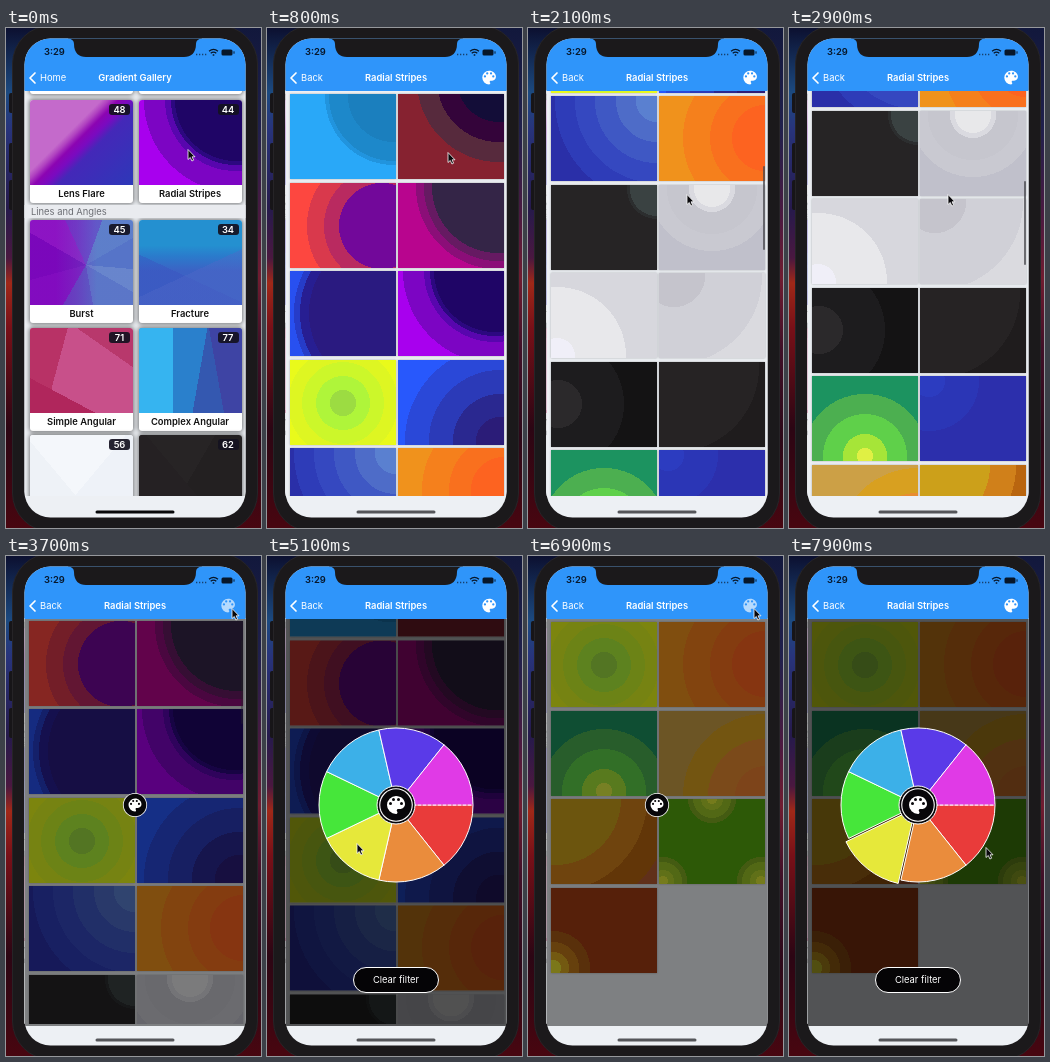
An HTML page for the animation above (8000 ms loop, 255 px wide and 500 px high).

```html
<!DOCTYPE html>
<html lang="en">
<head>
<meta charset="utf-8">
<title>Gradient gallery</title>
<style>
html, body { margin: 0; width: 100%; height: 100%; overflow: hidden; }
body { position: relative; font: 9.4px Inter, "Liberation Sans", sans-serif;
  background: linear-gradient(#0c1030, #1c4a80 13%, #28347c 20%, #261a4c 36%, #4a1840 46%, #a02818 51%, #781018 60%, #2c0614 80%, #480610) 0 0 / 50% 100% no-repeat,
    linear-gradient(#12183c, #20204c 20%, #4c1a40 38%, #701c30 50%, #401028 64%, #2c0818 82%, #480610); }
div, svg, span { position: absolute; box-sizing: border-box; }
svg { overflow: visible; }
.key { left: 3px; width: 5px; background: #171518; border-radius: 2px; }
#body { left: 6px; top: -3px; width: 246px; height: 507px; border-radius: 39px; background: #1b191b; border: 1px solid #262427; }
#screen { left: 0; top: 0; width: 255px; height: 500px; background: #edf0f4; clip-path: inset(10.5px 15.5px 10.5px 18.5px round 26px); }
#view { left: 18px; top: 62px; width: 222px; height: 406px; overflow: hidden; }
.page { left: 0; top: 0; width: 222px; height: 406px; background: #edf0f4; }
#detail { overflow: hidden; }
.list { left: 0; top: 0; }
.cell { width: 106px; height: 85px; box-shadow: 0 0 2px rgba(0,0,0,.3); }
.card { width: 103px; height: 103px; border-radius: 3px; overflow: hidden; background: #fff; box-shadow: 0 0 4px 1px rgba(0,0,0,.5); }
.card div { left: 0; top: 0; width: 103px; height: 85px; }
.card b { position: absolute; left: 0; top: 85px; width: 100%; line-height: 18px; text-align: center; font-weight: 600; color: #111; }
.card span { right: 3px; top: 4px; width: 21px; line-height: 11px; text-align: center; border-radius: 3px; background: rgba(20,18,32,.92); color: #fff; font-weight: 600; }
#bar { left: 217px; width: 2px; border-radius: 1px; background: rgba(70,70,75,.75); }
#nav { left: 18px; top: 10px; width: 222px; height: 52.5px; background: #2f95fa; }
.label { color: #fff; line-height: 14px; top: 43px; white-space: nowrap; }
.title { left: 29px; width: 200px; text-align: center; font-weight: 600; }
#clear { left: 86px; top: 411px; width: 86px; height: 26px; border: 1.5px solid #fff; border-radius: 13px; background: #050406; color: #fff; text-align: center; line-height: 23px; }
#shade { left: 18px; top: 62.5px; width: 222px; height: 407.5px; background: #000; }
</style>
</head>
<body>
<div class="key" style="top:65px;height:20px"></div>
<div class="key" style="top:115px;height:30px"></div>
<div class="key" style="top:152px;height:30px"></div>
<div id="body"></div>
<div id="screen">
  <div id="view">
    <div id="gallery" class="page"></div>
    <div id="detail" class="page">
      <div id="all" class="list"></div>
      <div id="some" class="list"></div>
      <div id="bar"></div>
    </div>
  </div>
  <div id="nav"></div>
  <span class="label" style="left:38px;top:17px;color:#07172a;font-weight:600">3:29</span>
  <span class="label" id="home" style="left:34px">Home</span>
  <span class="label" id="back" style="left:34px">Back</span>
  <span class="label title" id="title1">Gradient Gallery</span>
  <span class="label title" id="title2">Radial Stripes</span>
  <div id="shade"></div>
  <svg width="255" height="500">
    <defs>
      <path id="palette" d="M12 3a9 9 0 0 0 0 18c.83 0 1.5-.67 1.5-1.5 0-.39-.15-.74-.39-1.01-.23-.26-.38-.61-.38-.99 0-.83.67-1.5 1.5-1.5H16c2.76 0 5-2.24 5-5 0-4.42-4.03-8-9-8zM6.5 12a1.5 1.5 0 1 1 0-3 1.5 1.5 0 0 1 0 3zm3-4a1.5 1.5 0 1 1 0-3 1.5 1.5 0 0 1 0 3zm5 0a1.5 1.5 0 1 1 0-3 1.5 1.5 0 0 1 0 3zm3 4a1.5 1.5 0 1 1 0-3 1.5 1.5 0 0 1 0 3z" fill-rule="evenodd"/>
    </defs>
    <path d="M62 9H196V10.500Q190 11 190 16C190 25 185 29 178 29H80C73 29 68 25 68 16Q68 11 62 10.500Z" fill="#1b191b"/>
    <path d="M29 45l-5 5 5 5" fill="none" stroke="#fff" stroke-width="1.700" stroke-linecap="round" stroke-linejoin="round"/>
    <path d="M190 26.500h11" stroke="#17406e" stroke-width="1.300" stroke-dasharray="1.300 1.700"/>
    <g fill="none" stroke="#07172a" stroke-width="1.300">
      <path d="M203 23.200q4.500-3.600 9 0M204.700 25.200q2.800-2.200 5.600 0"/>
      <path d="M206.700 27h1.600"/>
    </g>
    <rect x="215.500" y="21.500" width="11" height="6" rx="1.500" fill="#07172a"/>
    <path d="M228 23.300v2.400" stroke="#07172a"/>
    <use id="tool" href="#palette" fill="#fff" transform="translate(213 40.500) scale(.76)"/>
    <g id="wheel"></g>
    <g id="hub">
      <circle r="16.800" fill="#fff"/><circle r="15.700" fill="#08070a"/>
      <use href="#palette" fill="#fff" transform="translate(-12 -12)"/>
    </g>
    <path id="grip" d="M91 484H167" stroke="#222224" stroke-width="3" stroke-linecap="round"/>
  </svg>
  <div id="clear">Clear filter</div>
</div>
<svg width="255" height="500">
  <path id="cursor" d="M0 .5V10.500L2.300 8.500 3.900 12 5.600 11.200 4.100 7.800H7Z" fill="#08070a" stroke="#fff" stroke-width=".8"/>
</svg>
<script>
const $ = id => document.getElementById(id);

// Hard-edged rings: centre, then "colour radius" pairs from the middle outwards, last colour fills.
const rings = (x, y, spec) => {
  const parts = spec.split(' ');
  let from = 0;
  const stops = [];
  for (let i = 0; i < parts.length; i += 2) {
    const to = parts[i + 1] || 300;
    stops.push(`${parts[i]} ${from}px ${to}px`);
    from = to;
  }
  return `radial-gradient(circle at ${x}px ${y}px, ${stops.join()})`;
};
const violet = rings(97, 0, '#1f0566 61 #2c0880 65 #5806ae 71 #7c05c3 92 #a800ee');
const spot = (x, y) => rings(x, y, '#dce834 5 #b4d22e 11 #9bc428 19 #80ac22 24 transparent');
const cells = [
  rings(104, 2, '#1b7fbe 46 #1d88ca 65 #2194de 69 #29a8f8'),
  rings(101, -14, '#130d38 42 #34043a 62 #572a3d 82 #862230'),
  rings(92, 43, '#72089a 43 #b92a60 58 #d9394c 75 #fd4740'),
  rings(100, 4, '#342547 66 #661a62 74 #8b0e78 82 #b8058e'),
  rings(96, 42, '#2a1a80 77 #271e92 86 #263cc8 92 #2850f0'),
  violet,
  rings(53, 43, '#9cdc42 13 #aff53a 27 #ccf72a 41 #def622 55 #e9fa1b'),
  rings(102, 81, '#2b1c78 24 #2a2890 47 #2b3ab8 71 #2a48d8 95 #2858fc'),
  rings(106, 5, '#5a80d0 21 #4e6cc8 41 #3f58c4 62 #3548c0 82 #2e3cb8 102 #2a2fa8'),
  rings(106, 42, '#fd6320 33 #f9701e 55 #f5801c 82 #f0921c'),
  rings(106, 4, '#3a4242 27 #2c2e2f 30 #262425'),
  rings(53, 4, '#e8e8ea 18 #dadae0 23 #c6c6ce 45 #c9c9d1 62 #c0c0cb'),
  rings(6, 83, '#f0eff8 18 #e8e8eb 69 #d7d7dd'),
  rings(15, 3, '#c5c4cc 31 #d0d0d7 88 #dadadf'),
  rings(7, 42, '#2b292b 24 #1d1c1e 66 #141314'),
  rings(15, 5, '#262324 85 #1f1c1d'),
  rings(53, 80, '#e0f044 8 #a6e538 22 #5fd04a 42 #4caf50 62 #1c9360'),
  rings(9, 5, '#2c3cc0 16 #2b36b6 50 #2c2fac'),
  rings(106, 85, '#ec8030 30 #e88c30 57 #d8a020 82 #cca046'),
  rings(4, 0, '#cca01a 66 #d0801a 92 #b9650f 118 #b55a30'),
  `${spot(53, 0)}, ${spot(4, 82)}, ${spot(102, 82)}, #54a80e`,
  rings(20, 20, '#4a2ab0 30 #38209a 60 #2a1878'),
  rings(2, 80, '#e8e030 8 #d8a820 16 #c07818 26 #a85a14 37 #a23c12'),
  rings(50, 40, '#2c2a2d 30 #1d1b1e')
];
const fill = (list, items) => list.innerHTML = items.map((bg, i) =>
  `<div class="cell" style="left:${i % 2 ? 113 : 4.5}px;top:${4 + (i >> 1) * 88.5}px;background:${bg}"></div>`).join('');
fill($('all'), cells);
fill($('some'), [6, 9, 16, 18, 19, 20, 22].map(i => cells[i]));

const cards = [
  ['', '', '#ddd', -99],
  ['', '', '#ddd', -99],
  ['Lens Flare', 48, 'linear-gradient(135deg,#c46acb 38%,#b042c0 42%,#8c04b2 47%,#7a0ac0 53%,#4428b8 60%,#2d38b8)', 9.5],
  ['Radial Stripes', 44, violet, 9.5],
  ['Burst', 45, 'conic-gradient(from 20deg at 56px 45px,#6488cc88 40deg,#5674c888 0 75deg,#7894d088 0 100deg,#6078c888 0 150deg,#5a50c088 0 190deg,#8010c088 0 235deg,#7208b888 0 280deg,#9420c888 0 315deg,#6c40c888 0),linear-gradient(90deg,#8406be 25%,#7630c0 45%,#5674c8 65%)', 130],
  ['Fracture', 34, 'linear-gradient(155deg,transparent 58%,#5068c866 0),linear-gradient(-155deg,transparent 62%,#3a50c066 0),linear-gradient(#2490d0 30%,#2a7ccc 42%,#3c62c4 60%)', 130],
  ['Simple Angular', 71, 'linear-gradient(28deg,#b0265c 25%,transparent 0),linear-gradient(105deg,#b83266 30%,transparent 0),linear-gradient(35deg,#c8508a 75%,#b8386c 0)', 238],
  ['Complex Angular', 77, 'linear-gradient(90deg,#36b4f0 33%,transparent 0),linear-gradient(80deg,transparent 72%,#3e44a4 0),linear-gradient(100deg,#2a80cc 58%,#3458b0 0)', 238],
  ['', 56, 'linear-gradient(50deg,#eef2f7 38%,transparent 0),linear-gradient(130deg,#f4f7fb 55%,#eef2f8 0)', 345],
  ['', 62, 'linear-gradient(50deg,#252123 45%,transparent 0),linear-gradient(120deg,#272425 50%,#232021 0)', 345]
];
$('gallery').innerHTML = cards.map(([name, count, bg, top], i) =>
  `<div class="card" style="left:${i % 2 ? 114.5 : 6}px;top:${top}px"><div style="background:${bg}"></div><b>${name}</b><span>${count}</span></div>`).join('') +
  '<span style="left:0;top:115px;width:222px;padding-left:7px;line-height:13px;background:#e9ebef;color:#6c6e74">Lines and Angles</span>';

// Colour wheel, clockwise from the right
const hues = ['#e93b3a', '#ea8c3c', '#e6e83a', '#46e63a', '#3cb0e8', '#5a3ae8', '#e03ae6'];
const step = 2 * Math.PI / hues.length;
const rim = k => `${77 * Math.cos(k * step)} ${77 * Math.sin(k * step)}`;
$('wheel').innerHTML = hues.map((c, i) =>
  `<path d="M0 0L${rim(i)}A77 77 0 0 1 ${rim(i + 1)}Z" fill="${c}" stroke="#fff"/>`).join('') +
  '<path d="M20 0H77" stroke="#e8409a" stroke-dasharray="2 3"/><circle r="19" fill="#08070a" stroke="#fff"/>';
const yellow = $('wheel').children[2];

// Piecewise linear value; each key is [time, value]
const at = (t, keys) => {
  if (t <= keys[0][0]) return keys[0][1];
  for (let i = 1; i < keys.length; i++) {
    const [t0, a] = keys[i - 1], [t1, b] = keys[i];
    if (t < t1) return a + (b - a) * (t - t0) / (t1 - t0);
  }
  return keys[keys.length - 1][1];
};
const path = [
  [0, 182, 121], [700, 181, 124], [1000, 181, 124], [1500, 165, 160], [2100, 159, 166], [3000, 159, 166],
  [3500, 226, 52], [4000, 226, 52], [4200, 200, 100], [4400, 200, 100], [4500, 150, 200], [4600, 150, 200],
  [4700, 105, 270], [5000, 105, 270], [5100, 90, 287], [5500, 90, 287], [6100, 226, 52], [7200, 226, 52], [7900, 197, 291]
];
const scrollKeys = [[950, 0], [1300, 40], [2100, 352], [2500, 470], [2800, 470], [3300, 250], [3700, 90], [3800, 70.5]];
const shadeKeys = [[3600, 0], [3700, .47], [3800, .65], [5200, .65], [5600, 0], [6800, 0], [6900, .47], [7000, .65]];
const hubKeys = [[3600, 0], [3700, .72], [3800, 1], [5300, 1], [5600, 0], [6800, 0], [6900, .72], [7000, 1]];
const wheelKeys = [[3700, 0], [3800, 1], [5200, 1], [5500, 0], [6900, 0], [7100, 1]];
const barKeys = [[950, 0], [1100, 1], [3600, 1], [3800, 0], [5700, 0], [5800, 1], [6300, 1], [6600, 0]];

function draw(t) {
  const push = 1 - (1 - at(t, [[100, 0], [700, 1]])) ** 3;
  $('gallery').style.transform = `translateX(${-66 * push}px)`;
  $('detail').style.transform = `translateX(${222 * (1 - push)}px)`;
  $('title1').style.opacity = $('home').style.opacity = 1 - push;
  $('title2').style.opacity = $('back').style.opacity = push;
  $('title1').style.transform = `translateX(${-70 * push}px)`;
  $('title2').style.transform = `translateX(${80 * (1 - push)}px)`;
  const tapped = (t >= 3600 && t < 3800) || (t >= 6800 && t < 7000);
  $('tool').style.opacity = push * (tapped ? .65 : 1);
  $('grip').style.stroke = t < 100 ? '#08080a' : '#55565a';

  const filtered = t >= 5500, y = at(t, scrollKeys);
  $('all').style.display = filtered ? 'none' : '';
  $('some').style.display = filtered ? '' : 'none';
  $('all').style.transform = `translateY(${-y}px)`;
  $('bar').style.top = (filtered ? 54 : 3 + y * .206) + 'px';
  $('bar').style.height = (filtered ? 351 : 84) + 'px';
  $('bar').style.opacity = at(t, barKeys);

  const open = at(t, wheelKeys);
  $('shade').style.opacity = at(t, shadeKeys);
  $('wheel').setAttribute('transform', `translate(129 249) scale(${open})`);
  $('hub').setAttribute('transform', `translate(129 249) scale(${at(t, hubKeys)})`);
  $('clear').style.opacity = open;
  const pop = t >= 5200 ? 4.3 : 0;
  yellow.setAttribute('transform', `translate(${pop * Math.cos(2.5 * step)} ${pop * Math.sin(2.5 * step)})`);

  const [x, cy] = [1, 2].map(k => at(t, path.map(p => [p[0], p[k]])));
  $('cursor').setAttribute('transform', `translate(${x} ${cy})`);
}

const start = performance.now();
function tick() {
  const t = (performance.now() - start) % 8000;
  draw(Math.floor(t / 100) * 100);
  requestAnimationFrame(tick);
}
tick();
</script>
</body>
</html>
```
